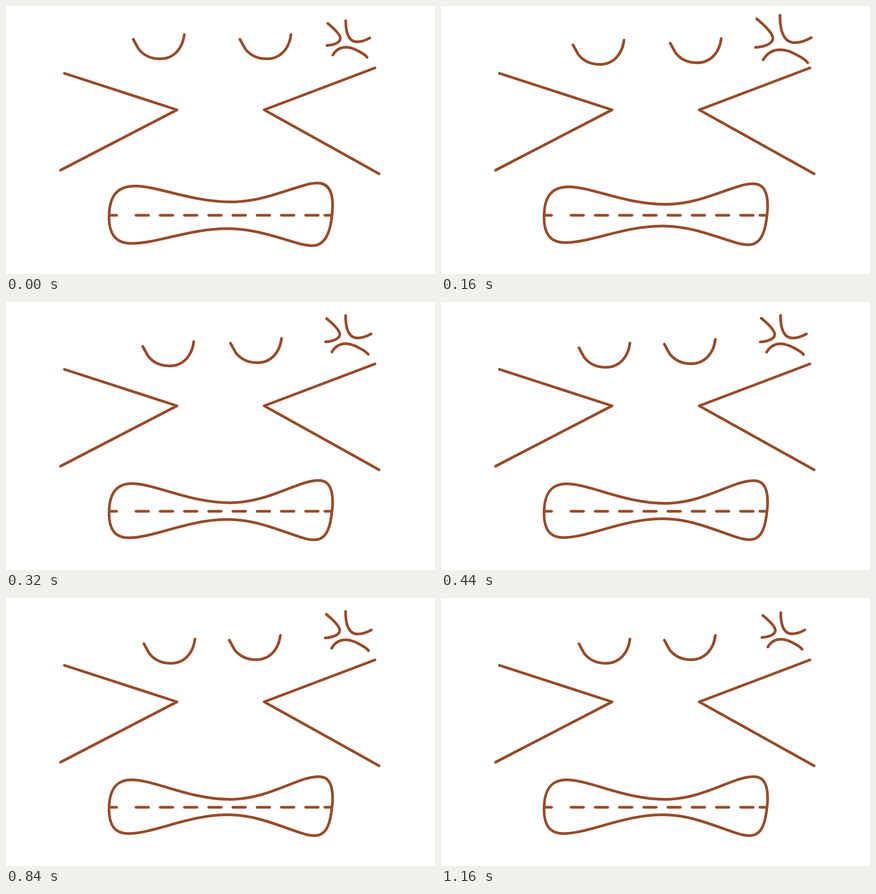
These frames come from a looping animation (947x591 px, 1200 ms). An HTML page:

```html
<!DOCTYPE html>
<html>
<head>
<meta charset="utf-8">
<style>
html, body { margin: 0; width: 100%; height: 100%; overflow: hidden; background: #fff; }
svg { display: block; width: 947px; height: 591px; }
path { fill: none; stroke: #964d2a; stroke-width: 6; stroke-linecap: round; stroke-linejoin: round; vector-effect: non-scaling-stroke; }
</style>
</head>
<body>
<svg viewBox="0 0 947 591">
  <path d="M129 148.5L377.5 229L120.5 362M814.5 136.5L570 229L823.5 370"/>
  <path id="teeth"/>
  <path id="mouth"/>
  <path id="left"/>
  <path id="right"/>
  <path id="anger" d="M710.5 38.5C722 48 738 63 738 71.5C738 80 725 86 708.5 87
    M750 32.5C750 62 758 79 775 79C784 79 795 75 803 70.5
    M721.5 108C728 97 738 91 750 91C762 91 770 95 777 99C786 103.5 794 108.5 797 113"/>
</svg>
<script>
const get = id => document.getElementById(id);
const FRAME = 40, LOOP = 1200;

const brow = 'M281 73.5L292.5 94.5C303 108 319 116.5 340 116.5C371 116.5 390 93 393.5 63';
const open = `M227.5 466C227.5 418 246 397 285 397C335 397 410 432 496 432
  C560 432 606 410 660 395C669 392 678 390.5 688 390.5C711 390.5 721 408 721 440
  C721 448 720.5 455 719.5 462C715 508 700 528.5 676 528.5C668 528.5 660 527 651 525
  C600 511 550 491 488 491C405 491 335 523.5 277 523.5C243 523.5 227.5 504 227.5 466Z`;
const tight = `M227.5 466C227.5 421 244 401 277 401C328 401 405 444 494 444
  C562 444 615 413 660 399C671 396 681 394 691 394C713 394 721 412 721 442
  C721 449 720.5 456 719.5 462C715 507 703 524 681 524C671 524 662 522 651 518
  C598 501 552 478 487 478C405 478 325 519.5 270 519.5C241 519.5 227.5 502 227.5 466Z`;

const number = /[\d.]+/g;
const tightNums = tight.match(number);
function morph(k) {
  let i = 0;
  return open.replace(number, a => +a + (tightNums[i++] - a) * k);
}

let teeth = 'M229 461.5H244M704 461.5H719';
for (let i = 0; i < 8; i++) teeth += `M${287 + 53.5 * i} 461.5h27.5`;
get('teeth').setAttribute('d', teeth);
get('left').setAttribute('d', brow);
get('right').setAttribute('d', brow);

function draw(now) {
  const n = Math.floor(now % LOOP / FRAME);
  const k = Math.min(n / 9, 1);
  get('mouth').setAttribute('d', morph(k));
  get('left').setAttribute('transform', `translate(${23.5 * k} ${27.5 * k})`);
  get('right').setAttribute('transform', `translate(${235.5 - 23.5 * k} ${19.5 * k})`);

  // Three pulses: four steps out, five steps back
  const p = n % 10;
  const s = 1 + 0.3 * (p < 4 ? p / 4 : (9 - p) / 5);
  get('anger').setAttribute('transform',
    `translate(755.75 72.75) scale(${s}) translate(-755.75 -72.75)`);
}

let start;
function tick(now) {
  start ??= now;
  draw(now - start);
  requestAnimationFrame(tick);
}
draw(0);
requestAnimationFrame(tick);
</script>
</body>
</html>
```
